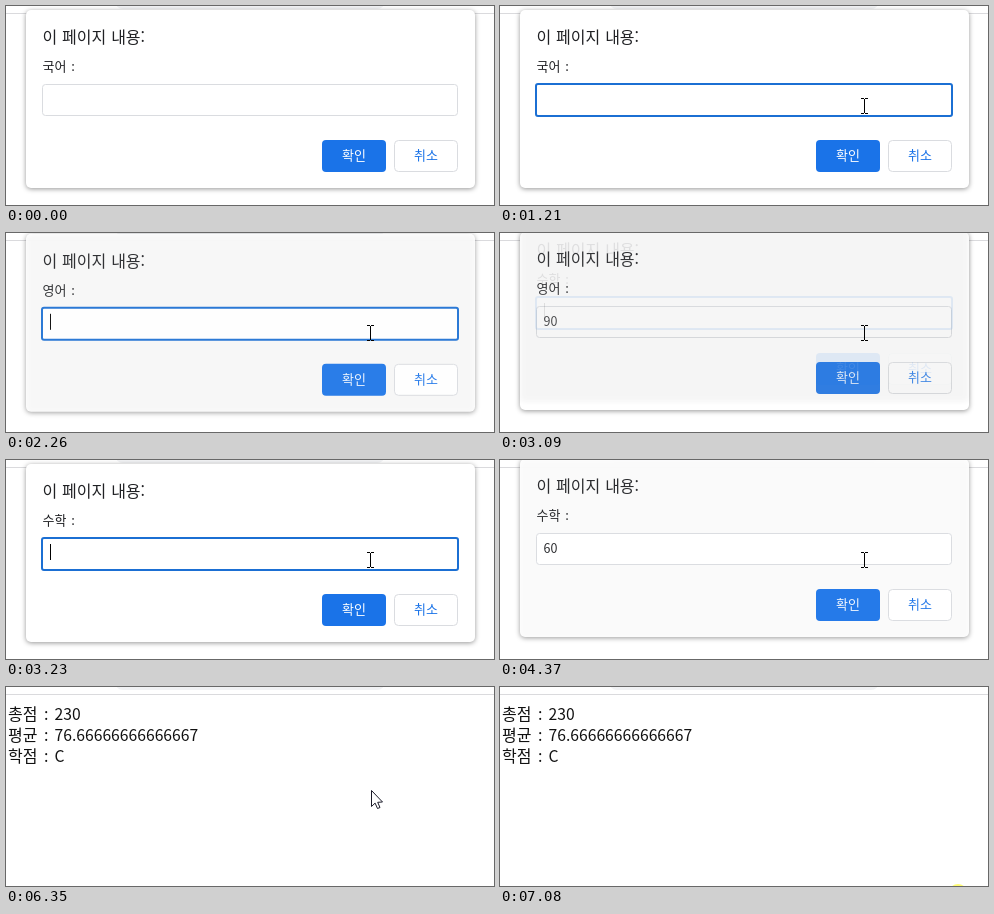
Recreate the animation shown at these times as an HTML page with a canvas. Size 488 by 199 pixels, loop 7.14 s.

```html
<!DOCTYPE html>
<html lang="ko">
<head>
<meta charset="utf-8">
<title>점수 입력</title>
<style>
  html, body { margin: 0; width: 100%; height: 100%; overflow: hidden; background: #fff; }
  canvas { display: block; }
</style>
</head>
<body>
<canvas id="stage" width="488" height="199"></canvas>
<script>
const ctx = document.getElementById('stage').getContext('2d');
const LOOP = 7140;
const FONT = '"Noto Sans CJK KR", "Noto Sans CJK", "Noto Sans CJK JP", sans-serif';
const BLUE = '#1a73e8', GREY = '#dadce0', INK = '#202124';

// open: fully shown, type: times of both digits, close: Enter pressed
const PROMPTS = [
  { label: '국어 :', value: '80', open: 0, focus: 690, blink: 1210, type: [1670, 1800], close: 2130 },
  { label: '영어 :', value: '90', open: 2330, focus: 0, blink: 2660, type: [2660, 2790], close: 3090 },
  { label: '수학 :', value: '60', open: 3230, focus: 0, blink: 3630, type: [4030, 4100], close: 4370 }
];
const ENTER = [[446, 186], [428, 150], [397, 98], [372, 60], [365, 86], [364, 100]];
const RESULTS = [['총점', '230'], ['평균', '76.66666666666667'], ['학점', 'C']];

function text(str, x, y, size, color, gap = 0) {
  ctx.font = `${size}px ${FONT}`;
  ctx.wordSpacing = `${gap}px`;
  ctx.fillStyle = color;
  ctx.fillText(str, x, y);
}

function box(x, y, w, h, r, fill, stroke, line = 1) {
  ctx.beginPath();
  ctx.roundRect(x, y, w, h, r);
  if (fill) { ctx.fillStyle = fill; ctx.fill(); }
  if (stroke) { ctx.strokeStyle = stroke; ctx.lineWidth = line; ctx.stroke(); }
}

function page(showResults) {
  ctx.fillStyle = '#fff';
  ctx.fillRect(0, 0, 488, 199);
  box(109, -24, 270, 27, 8, '#f1f2f4');
  ctx.fillStyle = '#dadadd';
  ctx.fillRect(0, 7, 488, 1);
  if (!showResults) return;
  RESULTS.forEach(([name, value], i) => {
    const y = 33 + i * 21;
    text(name, 2, y, 16, '#111');
    text(':', 38, y, 16, '#111');
    text(value, 48.5, y, 15.7, '#111');
  });
}

function dialog(p, t, dy = 0, alpha = 1, closing = false) {
  ctx.save();
  ctx.globalAlpha = alpha;
  ctx.translate(0, dy);

  ctx.save();
  ctx.shadowColor = 'rgba(0,0,0,.42)';
  ctx.shadowBlur = 5;
  ctx.shadowOffsetY = 1;
  box(20, 4, 449, 178, 5, '#fff');
  ctx.restore();

  text('이 페이지 내용:', 36.5, 37, 16, INK, 1.3);
  text(p.label, 36.5, 65, 13, INK, 2);

  if (t >= p.focus && !closing) box(36, 78, 416, 32, 2, '#fff', '#1b6fd3', 2);
  else box(36.5, 78.5, 415, 31, 3, '#fff', GREY);

  const typed = p.type.filter(s => t >= s).length;
  text(p.value.slice(0, typed), 43.5, 98, 12.5, INK);
  const caret = t >= p.focus && !closing && (typed || t < p.blink);
  if (caret) {
    ctx.fillStyle = '#000';
    ctx.fillRect(44 + typed * 7, 84, 1, 16);
  }

  box(316, 134, 64, 32, 4, BLUE);
  text('확인', 336, 154, 13, '#fff');
  box(388.5, 134.5, 63, 31, 4, '#fff', GREY);
  text('취소', 408, 154, 13, BLUE);
  ctx.restore();
}

function arrow(x, y) {
  ctx.save();
  ctx.translate(x + .5, y + .5);
  ctx.beginPath();
  ctx.moveTo(0, 0);
  [[0, 16], [3.6, 12.6], [6, 18], [8.5, 17], [6.2, 11.8], [11, 11.5]].forEach(q => ctx.lineTo(...q));
  ctx.closePath();
  ctx.fillStyle = '#fff';
  ctx.fill();
  ctx.strokeStyle = '#1a1a28';
  ctx.lineWidth = 1;
  ctx.stroke();
  ctx.restore();
}

function beam(x, y) {
  ctx.fillStyle = '#000';
  ctx.fillRect(x, y - 7, 1, 14);
  for (const end of [y - 8, y + 7]) {
    ctx.fillRect(x - 3, end, 3, 1);
    ctx.fillRect(x + 1, end, 3, 1);
  }
}

function halo(x, y) {
  ctx.beginPath();
  ctx.arc(x, y, 9.5, 0, Math.PI * 2);
  ctx.fillStyle = 'rgba(255,250,0,.55)';
  ctx.fill();
}

function dialogs(t) {
  const [a, b, c] = PROMPTS;
  if (t < a.close) dialog(a, t);
  else if (t < 2200) dialog(a, t, -5, 1, true);
  else if (t < 2260) { dialog(a, t, -9, .35, true); dialog(b, t, -10, .3); }
  else if (t < b.open) dialog(b, t, -3.2, .92);
  else if (t < b.close) dialog(b, t);
  else if (t < 3160) { dialog(b, t, -5, 1, true); dialog(c, t, -14, .1); }
  else if (t < c.open) dialog(c, t, -3.2, .92);
  else if (t < c.close) dialog(c, t);
  else if (t < 4440) dialog(c, t, -5, .95, true);
  else if (t < 4500) dialog(c, t, -10, .4, true);
}

function pointer(t) {
  if (t >= 70 && t < 420) {
    const [x, y] = ENTER[Math.floor((t - 70) / 70)];
    if (y > 77 && y < 111) beam(x, y); else arrow(x, y);
  } else if (t >= 420 && t < 4500) {
    if (t >= 690 && t < 750) halo(364, 100);
    beam(364, 100);
  } else if (t >= 4500 && t < 6350) {
    arrow(362, 99);
  } else if (t >= 6350 && t < 6880) {
    const k = (Math.floor((t - 6350) / 66.25) + 1) / 9;
    const e = k * k * (3 - 2 * k);
    arrow(Math.round(362 + 90 * e), Math.round(99 + 104 * e));
  }
  if (t >= 7080) halo(458, 206.5);
}

function draw(t) {
  page(t >= 4500);
  dialogs(t);
  pointer(t);
}

const start = performance.now();
function tick() {
  draw((performance.now() - start) % LOOP);
  requestAnimationFrame(tick);
}
tick();
</script>
</body>
</html>
```
